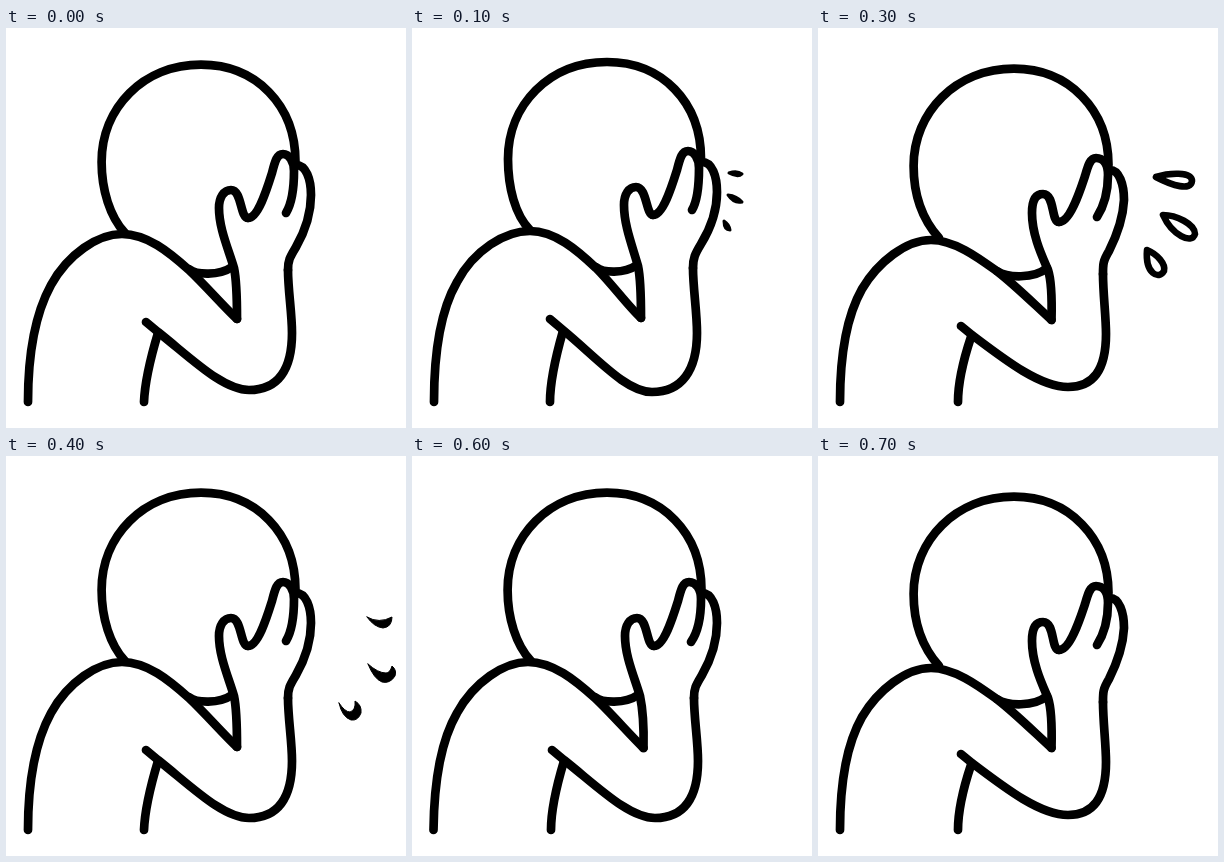
Animation, 400 px wide and 400 px high, one loop 0.8 s. Source, as an HTML page without scripts:

```html
<!DOCTYPE html>
<html lang="en">
<head>
<meta charset="utf-8">
<title>Sobbing figure</title>
<style>
  html, body { margin: 0; width: 100%; height: 100%; overflow: hidden; background: #fff; }
  svg { display: block; width: 100%; height: 100%; }
  path { fill: none; stroke: #000; stroke-linecap: round; stroke-linejoin: round; }

  /* body: four held poses, twice per loop */
  .pose { visibility: hidden; animation: pose .4s step-end infinite; }
  .pose path { stroke-width: 8.7; }
  .rise { animation-delay: -.3s; }
  .back { animation-delay: -.2s; }
  .sink { animation-delay: -.1s; }
  .level { animation: level .2s step-end infinite; }
  @keyframes pose { 0% { visibility: visible } 25%, 100% { visibility: hidden } }
  @keyframes level { 0% { visibility: visible } 50%, 100% { visibility: hidden } }

  /* tears: one burst per loop */
  .tears { visibility: hidden; animation: tears .8s step-end infinite; }
  .tears path { stroke-width: 6.6; }
  .t1 { animation-delay: -.7s; }
  .t2 { animation-delay: -.6s; }
  .t3 { animation-delay: -.5s; }
  .t4 { animation-delay: -.4s; }
  .t1 path { fill: #000; stroke-width: 3; }
  .t4 path { fill: #000; stroke-width: 1; }
  @keyframes tears { 0% { visibility: visible } 12.5%, 100% { visibility: hidden } }
</style>
</head>
<body>
<svg viewBox="0 0 400 400">
  <!-- strokes shared by both level poses -->
  <g class="pose level">
    <path d="M119 205C104 189 95.6 162 95.6 134C95.6 80 137 36.7 195 36.7C250 36.7 289.5 77 289.5 134"/>
    <path d="M183 241C190 247 213 248 226 239"/>
    <path d="M290 137C300 137 305 151 305 167C305 188 298 205 290 219C284 229 282 232 282 242"/>
    <path d="M282 242C282 262 286 285 286 305C286 342 272 362 243 362C217 362 186 331 152 304L140 294"/>
  </g>

  <g class="pose">
    <path d="M22 374C22 330 28 288 45 257C62 226 92 206 116 206C141 206 163 224 183 242C199 257 218 279 231 291"/>
    <path d="M231 291C231 270 231 254 228 240C222 220 213 200 213 180C213 169 218 162 225 162C236 162 234 190 242 190"/>
    <path d="M242 190C252 190 261 161 266 145C269 133 271 126 277 126C283 126 288 133 288 143C288 160 286 175 280 185"/>
    <path d="M152 305C146 325 139 350 138 374"/>
  </g>

  <g class="pose rise">
    <path d="M118 202C103 187 96 159 96 131C96 77 137 34 195 34C250 34 289 74 289 131"/>
    <path d="M184 239C191 245 212 246 225 237"/>
    <path d="M22 374C22 328 27 285 45 254C62 222 93 203 118 203C143 203 165 222 184 240C200 256 216 278 229 290"/>
    <path d="M229 290C229 269 229 252 226 238C220 217 212 197 212 177C212 166 217 159 224 159C235 159 234 187 241 187"/>
    <path d="M241 187C251 187 260 158 265 142C268 130 270 123 276 123C282 123 287 130 287 140C287 157 286 172 280 182"/>
    <path d="M290 134C300 134 305 148 305 164C305 185 297 203 289 216C283 226 281 230 281 240"/>
    <path d="M281 240C281 260 285 284 285 305C285 342 270 364 240 364C214 364 185 330 151 302L138 291"/>
    <path d="M151 303C145 324 138 350 138 374"/>
  </g>

  <g class="pose back">
    <path d="M21.5 374C22 330 27 288 45 257C62 226 92 206 116 206C141 206 163 224 183 242C199 257 218 279 231.5 292"/>
    <path d="M231.5 292C232 270 231 254 228 240C222 220 213 200 213 180C213 169 218 162 225 162C236 162 234 190 242 190"/>
    <path d="M242 190C252 190 261 161 266 145C269 133 271 126 277 126C284 126 289 133 289 143C289 160 286 176 279 186"/>
    <path d="M152 305C146 325 139 350 139 374"/>
  </g>

  <g class="pose sink">
    <path d="M121 210C104 191 95.6 166 95.6 138C95.6 84 138 40.7 196 40.7C251 40.7 290.5 82 290.5 137"/>
    <path d="M179 243C189 250 216 251 229 240"/>
    <path d="M22 374C22 330 27 291 44 261C60 234 88 212 113 212C137 212 162 231 180 244C198 258 217 277 233.5 292"/>
    <path d="M233.5 292C234 272 234 254 230 242C224 228 214 207 214 185C214 172 218 166 225 166C237 166 233 194 241 194"/>
    <path d="M241 194C252 194 262 163 267 148C270 138 272 130 278 130C285 130 290 136 290 147C290 164 286 178 279 189"/>
    <path d="M292 142C301 142 306 156 306 172C305 192 298 209 291 223C285 233 285 236 285 246"/>
    <path d="M285 246C285 266 288 288 288 306C288 342 275 359 250 359C222 359 187 332 154 307L143 298"/>
    <path d="M153 309C147 327 140 350 140 374"/>
  </g>

  <g class="tears t1">
    <path d="M317 145Q325 142 330 146Q326 150 317 145Z"/>
    <path d="M316 167Q325 168 330 174Q322 176 316 167Z"/>
    <path d="M312 193Q317 196 318 202Q312 202 312 193Z"/>
  </g>
  <g class="tears t2">
    <path d="M329 146C340 142 357 140 357 148C356 156 341 152 329 146Z"/>
    <path d="M330 176C341 177 358 179 358 186C355 195 337 188 330 176Z"/>
    <path d="M321 205C329 207 336 212 334 218C331 224 321 221 321 205Z"/>
  </g>
  <g class="tears t3">
    <path d="M338 149C350 145 374 143 374 153C373 163 355 158 338 149Z"/>
    <path d="M345 187C358 187 377 196 377 206C374 217 354 207 345 187Z"/>
    <path d="M329 222C339 226 348 236 346 243C341 252 327 246 329 222Z"/>
  </g>
  <g class="tears t4">
    <path d="M361 161Q373 168 386 161Q386 171 377 172Q368 171 361 161Z"/>
    <path d="M362 208Q372 217 380 217Q384 217 386 210Q391 214 389 220Q384 228 376 226Q368 223 362 208Z"/>
    <path d="M333 247Q339 256 344 256Q350 254 349 245Q356 249 355 257Q352 265 345 264Q336 261 333 247Z"/>
  </g>
</svg>
</body>
</html>
```
